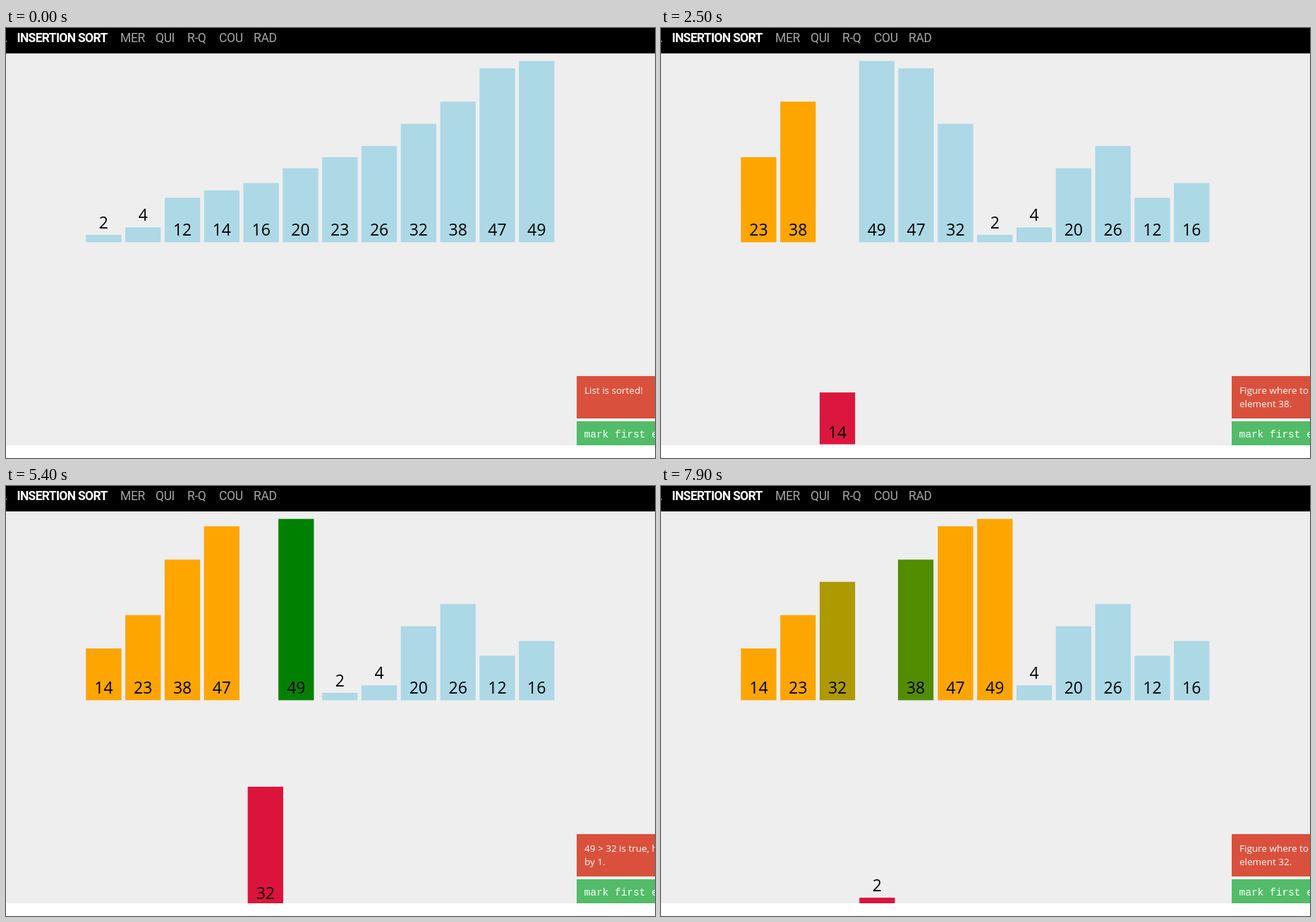
Recreate the animation shown at these times as an HTML page. Size 920 px wide and 609 px high, loop 8 s.

```html
<!DOCTYPE html>
<html lang="en">
<head>
<meta charset="utf-8">
<title>Insertion sort</title>
<style>
  html, body { margin: 0; width: 100%; height: 100%; overflow: hidden; background: #fff; }
  svg { display: block; }
  text { white-space: pre; }
  .nav { font: 17.5px Roboto, sans-serif; letter-spacing: -.4px; fill: #a6a6a6; }
  .nav .active { font-weight: 700; letter-spacing: -.7px; fill: #fff; }
  .bars { font: 23px "Open Sans", sans-serif; text-anchor: middle; }
  .status { font: 13.5px "Open Sans", sans-serif; fill: #fff; }
  .code { font: 14.5px "Liberation Mono", monospace; fill: #fff; }
</style>
</head>
<body>
<svg width="920" height="609" viewBox="0 0 920 609">
  <rect width="920" height="591" fill="#eee"/>
  <rect width="920" height="36" fill="#000"/>
  <g class="nav">
    <rect y="18" width="1" height="2"/>
    <text class="active" x="15.5" y="20">INSERTION SORT</text>
    <text x="162" y="20">MER</text>
    <text x="212" y="20">QUI</text>
    <text x="257" y="20">R-Q</text>
    <text x="302" y="20">COU</text>
    <text x="351" y="20">RAD</text>
  </g>
  <g class="bars" id="bars"></g>
  <rect y="591" width="920" height="18" fill="#fff"/>
  <rect x="809" y="493" width="111" height="60" fill="#d9513c"/>
  <rect x="809" y="557" width="111" height="34" fill="#52bc69"/>
  <g class="status">
    <text id="line1" x="820" y="518"></text>
    <text id="line2" x="820" y="536.5"></text>
  </g>
  <text class="code" x="819.5" y="580">mark first element as sorted</text>
</svg>
<script>
const LOOP = 8000, TICK = 100;
const LEFT = 113.3, SLOT = 55.8, BAR = 50.3, BASE = 303.4, UNIT = 5.24, DROP = 290.2;
const BLUE = [173, 216, 230], ORANGE = [255, 165, 0], GREEN = [0, 128, 0], CRIMSON = [220, 20, 60];
const LIST = [38, 23, 14, 49, 47, 32, 2, 4, 20, 26, 12, 16];

// A step ends before its transition does; the next one takes over from there.
const CUTOFF = 0.848;
// [time in ms, steps done]
const PACE = [[1100, 0.368], [2500, 8.1], [4200, 17.344], [5400, 23.823], [7200, 33.745], [7900, 37.508]];

const ease = p => p < 0.5 ? 4 * p ** 3 : 1 - 4 * (1 - p) ** 3;
const mix = (a, b, p) => a + (b - a) * p;

// A pose is [slot, drop, r, g, b].
const sorted = [...LIST].sort((a, b) => a - b);
const startPoses = LIST.map(v => [sorted.indexOf(v), 0, ...BLUE]);

function buildSteps() {
  const order = [...LIST], drop = {}, color = {}, steps = [];
  const record = (line1 = '', line2 = '') => steps.push({
    line1, line2,
    poses: LIST.map(v => [order.indexOf(v), drop[v] || 0, ...(color[v] || BLUE)])
  });

  record();
  record();
  color[order[0]] = ORANGE;
  record(`Mark the first element (${order[0]}) as sorted.`);

  for (let i = 1; i < order.length; i++) {
    const x = order[i];
    drop[x] = 1;
    color[x] = CRIMSON;
    record(`Extract the first unsorted element (${x}).`);

    let j = i - 1, message = 'Insert extracted element here.';
    for (; j >= 0; j--) {
      const y = order[j];
      color[y] = GREEN;
      record('Figure where to insert extracted element; comparing with sorted', `element ${y}.`);
      if (y < x) {
        message = `${y} > ${x} is false, insert element at current position.`;
        break;
      }
      [order[j], order[j + 1]] = [x, y];
      record(`${y} > ${x} is true, hence move current sorted element (${y}) to the right`, 'by 1.');
      color[y] = ORANGE;
    }
    if (j >= 0) color[order[j]] = ORANGE;
    drop[x] = 0;
    color[x] = ORANGE;
    record(message);
  }
  return steps;
}

function progressAt(time) {
  if (time < PACE[0][0]) return 0;
  const i = Math.max(1, PACE.findIndex(([t]) => t >= time));
  const [t0, p0] = PACE[i - 1], [t1, p1] = PACE[i];
  return mix(p0, p1, (time - t0) / (t1 - t0));
}

function add(parent, tag, attrs) {
  const node = document.createElementNS(parent.namespaceURI, tag);
  for (const key in attrs) node.setAttribute(key, attrs[key]);
  return parent.appendChild(node);
}

const byId = id => document.getElementById(id);
const line1 = byId('line1'), line2 = byId('line2');
const steps = buildSteps();
const bars = LIST.map(value => {
  const group = add(byId('bars'), 'g', {}), height = value * UNIT;
  add(group, 'rect', { y: BASE - height, width: BAR, height });
  add(group, 'text', { x: BAR / 2, y: BASE - 9 - (height < 30 ? height : 0) }).textContent = value;
  return group;
});

function draw(time) {
  const progress = progressAt(time);
  let poses = startPoses;
  for (let k = 0; k < progress; k++) {
    const p = ease(Math.min(1, progress - k) * CUTOFF);
    poses = poses.map((pose, i) => pose.map((n, c) => mix(n, steps[k].poses[i][c], p)));
  }
  poses.forEach(([slot, drop, ...rgb], i) => {
    bars[i].setAttribute('transform', `translate(${LEFT + slot * SLOT} ${drop * DROP})`);
    bars[i].firstChild.setAttribute('fill', `rgb(${rgb.map(Math.round)})`);
  });
  const message = progress ? steps[Math.floor(progress)] : { line1: 'List is sorted!', line2: '' };
  line1.textContent = message.line1;
  line2.textContent = message.line2;
}

const begin = performance.now();
function frame() {
  const time = (performance.now() - begin) % LOOP;
  draw(Math.floor(time / TICK) * TICK);
  requestAnimationFrame(frame);
}
frame();
</script>
</body>
</html>
```
